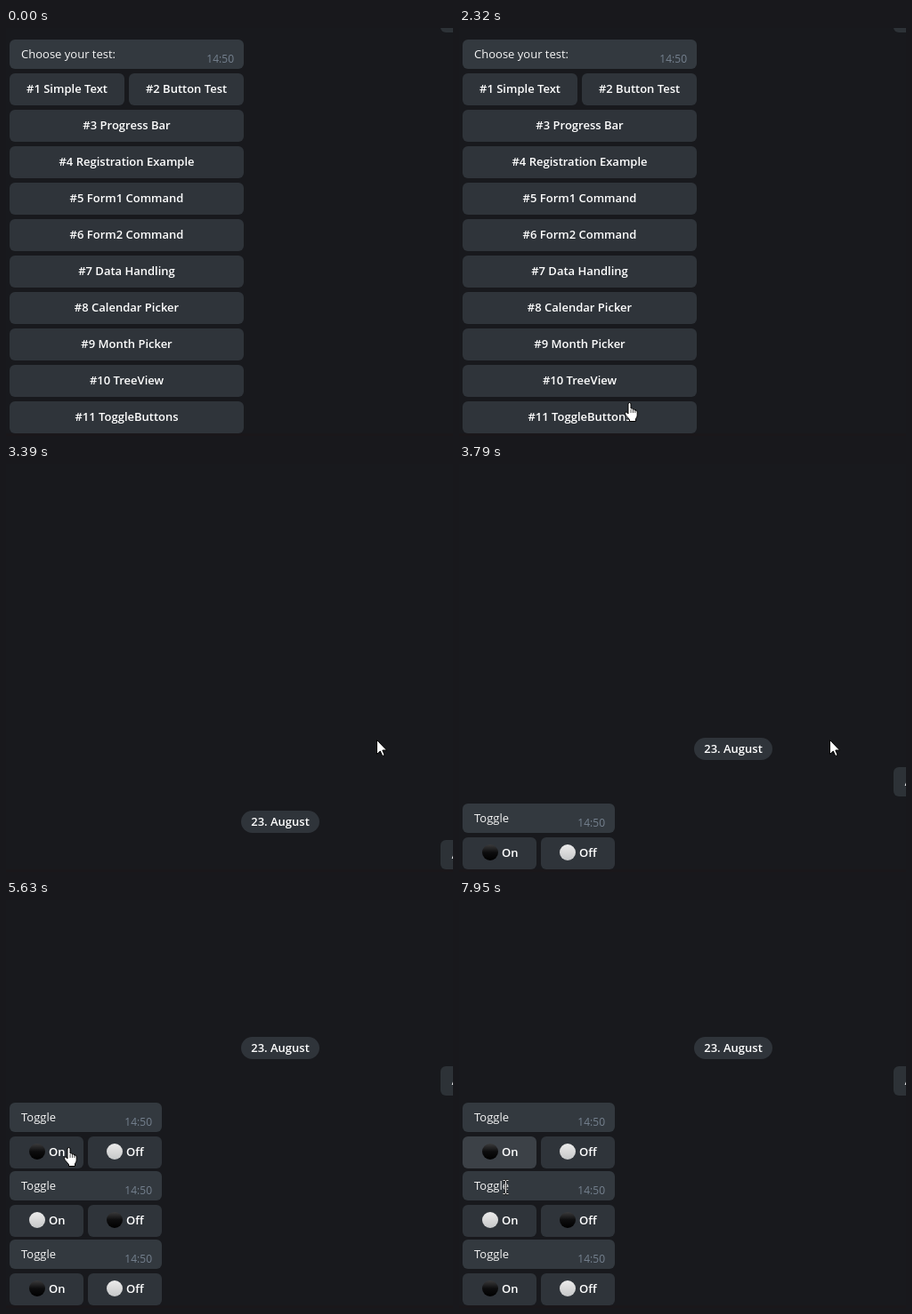
These frames come from a looping animation (502x459 px, 8 s). An HTML page with a canvas:

```html
<!DOCTYPE html>
<html lang="en">
<head>
<meta charset="utf-8">
<title>Bot menu</title>
<style>
html, body { margin: 0; width: 100%; height: 100%; overflow: hidden; background: #18191d; }
canvas { display: block; }
</style>
</head>
<body>
<canvas id="stage" width="502" height="459"></canvas>
<script>
const ctx = document.getElementById('stage').getContext('2d');
const LOOP = 8000;
const FONT = '"Open Sans", sans-serif';
const BUTTON = '#2f343a', HOVER = '#343a40', LIT = '#3c4147', BUBBLE = '#33393f';

const labels = ['#3 Progress Bar', '#4 Registration Example', '#5 Form1 Command',
  '#6 Form2 Command', '#7 Data Handling', '#8 Calendar Picker',
  '#9 Month Picker', '#10 TreeView', '#11 ToggleButtons'];

// Pointer moves: first step time, last step time, number of steps, end point, bend
const moves = [
  { a: 70, b: 70, n: 1, x: 396, y: 355 },
  { a: 145, b: 220, n: 2, x: 394, y: 281 },
  { a: 1530, b: 1530, n: 1, x: 395, y: 281 },
  { a: 1700, b: 2400, n: 10, x: 167, y: 430, bend: 20 },
  { a: 2470, b: 2470, n: 1, x: 170, y: 434 },
  { a: 2530, b: 2530, n: 1, x: 165, y: 431 },
  { a: 3080, b: 3240, n: 3, x: 416, y: 310 },
  { a: 4870, b: 5250, n: 6, x: 47, y: 276 },
  { a: 5630, b: 5780, n: 3, x: 136, y: 283 },
  { a: 7100, b: 7480, n: 6, x: 47, y: 287 },
  { a: 7870, b: 7950, n: 2, x: 53, y: 323 }
];

const within = (t, a, b) => t >= a && t < b;
const ease = p => p * p * (3 - 2 * p);

function pointerAt(t) {
  if (t < moves[0].a) return null;
  let x = 396, y = 374;
  for (const m of moves) {
    if (t < m.a) break;
    const gap = m.n > 1 ? (m.b - m.a) / (m.n - 1) : 1;
    const step = Math.min(m.n, Math.floor((t - m.a) / gap + 1e-6) + 1);
    const p = ease(step / m.n);
    x += (m.x - x) * p;
    y += (m.y - y) * p + (m.bend || 0) * Math.sin(Math.PI * p);
  }
  return { x: Math.round(x), y: Math.round(y) };
}

function box(x, y, w, h, r, fill) {
  ctx.fillStyle = fill;
  ctx.beginPath();
  ctx.roundRect(x, y, w, h, r);
  ctx.fill();
}

function text(str, x, y, { size = 13, weight = 400, color = '#fff', align = 'left' } = {}) {
  ctx.font = `${weight} ${size}px ${FONT}`;
  ctx.fillStyle = color;
  ctx.textAlign = align;
  ctx.fillText(str, x, y);
}

function bubble(x, y, w, str) {
  box(x, y, w, 33, 6, BUBBLE);
  text(str, x + 13, y + 21, { color: '#f5f5f5' });
  text('14:50', x + w - 11, y + 26, { size: 12, color: '#75818f', align: 'right' });
}

function button(x, y, w, str, fill = BUTTON) {
  box(x, y, w, 36, 6, fill);
  if (str) text(str, x + w / 2, y + 22, { weight: 600, align: 'center' });
}

function ripple(x, y, r, bx, by, bw) {
  ctx.save();
  ctx.beginPath();
  ctx.roundRect(bx, by, bw, 36, 6);
  ctx.clip();
  ctx.fillStyle = 'rgba(255,255,255,.06)';
  ctx.beginPath();
  ctx.arc(x, y, r, 0, 7);
  ctx.fill();
  ctx.restore();
}

function spinner(right, bottom) {
  ctx.strokeStyle = '#fff';
  ctx.lineWidth = 2;
  ctx.beginPath();
  ctx.arc(right - 7.5, bottom - 7.5, 4.5, -Math.PI / 2, Math.PI);
  ctx.stroke();
}

function ball(x, y, white) {
  const g = ctx.createLinearGradient(0, y - 9, 0, y + 9);
  const stops = white ? ['#ececec', '#d9d9d9', '#c6c8c9'] : ['#3b3b3c', '#0d0d0e', '#000'];
  stops.forEach((c, i) => g.addColorStop(i / 2, c));
  ctx.fillStyle = g;
  ctx.beginPath();
  ctx.arc(x, y, 9, 0, 7);
  ctx.fill();
}

function menu(t) {
  bubble(4, 13, 263, 'Choose your test:');
  button(4, 51, 129, '#1 Simple Text');
  button(138, 51, 129, '#2 Button Test');
  labels.forEach((label, i) => {
    const hot = i === 7 ? t >= 3160 : i === 8 && within(t, 2400, 3160);
    button(4, 92 + 41 * i, 263, label, hot ? HOVER : BUTTON);
  });
  if (within(t, 2780, 3080)) ripple(170, 437, t < 2850 ? 10 : 17, 4, 420, 263);
  if (within(t, 2850, 3080)) spinner(267, 456);
}

function toggle(y, on, litOn) {
  bubble(4, y, 171, 'Toggle');
  button(4, y + 38, 83, '', litOn ? LIT : BUTTON);
  button(92, y + 38, 83, '');
  ball(35, y + 55, !on);
  ball(122, y + 55, on);
  text('On', 48, y + 60, { weight: 600 });
  text('Off', 135, y + 60, { weight: 600 });
}

function toggles(t, count) {
  const states = [!within(t, 6480, 7790), false, true];
  for (let i = 0; i < count; i++) {
    toggle(382 - 77 * (count - 1 - i), states[i], i === 0 && t >= 7640);
  }
  if (within(t, 7560, 7640)) ripple(47, 287, 20, 4, 266, 83);
  if (within(t, 6180, 6560)) spinner(175, 302);
  if (within(t, 7640, 7870)) spinner(87, 302);
}

function header(y) {
  box(264, y - 33, 88, 25, 12.5, BUTTON);
  text('23. August', 308, y - 16, { weight: 600, align: 'center' });
  box(488, y, 60, 33, 6, '#2d3237');
  text('/start', 500.5, y + 21);
}

function shape(path, x, y) {
  ctx.save();
  ctx.translate(x, y);
  const p = new Path2D(path);
  ctx.fillStyle = '#fff';
  ctx.strokeStyle = '#000';
  ctx.lineWidth = 1;
  ctx.lineJoin = 'round';
  ctx.fill(p);
  ctx.stroke(p);
  ctx.restore();
}

function hand(x, y) {
  shape('M4 13V2Q4 .5 5.5 .5T7 2V7Q9 6.3 9.5 8Q11.3 7.3 11.8 9Q14.2 8.6 14.2 11V15Q14 17 12.5 18.5V21.5H5.5V19.5L1.2 14.5Q-.2 12 1.2 11Q2.5 10.5 4 13Z', x - 5, y);
  ctx.fillStyle = '#000';
  for (const dx of [2, 4.4, 6.8]) ctx.fillRect(x + dx - .3, y + 8, .7, 4);
}

function beam(x, y) {
  const path = new Path2D('M-3 -7.5H-1L0 -6.5L1 -7.5H3M0 -6.5V6.5M-3 7.5H-1L0 6.5L1 7.5H3');
  ctx.save();
  ctx.translate(x - .5, y);
  for (const [color, width] of [['#222', 2.4], ['#eee', 1]]) {
    ctx.strokeStyle = color;
    ctx.lineWidth = width;
    ctx.stroke(path);
  }
  ctx.restore();
}

function pointer(t) {
  const p = pointerAt(t);
  if (!p) return;
  const overButton = t < 3390
    ? p.x < 267
    : p.x < 175 && p.y >= 266 && p.y < 302;
  if (overButton) hand(p.x, p.y);
  else if (t > 7790) beam(p.x, p.y);
  else shape('M.5 .5V16.5L4.3 13L6.8 18.5L9.2 17.5L6.8 12H11.6Z', p.x, p.y);
}

function draw(t) {
  ctx.fillStyle = '#18191d';
  ctx.fillRect(0, 0, 502, 459);
  ctx.fillStyle = '#1a171a';
  ctx.fillRect(0, 456, 502, 3);
  if (t < 3390) {
    header(-28);
    menu(t);
  } else {
    const count = [3790, 3860, 4010].filter(s => t >= s).length;
    header(count ? 418 - 77 * count : 423);
    toggles(t, count);
  }
  pointer(t);
}

const start = performance.now();
function frame() {
  draw((performance.now() - start) % LOOP);
  requestAnimationFrame(frame);
}
frame();
</script>
</body>
</html>
```
